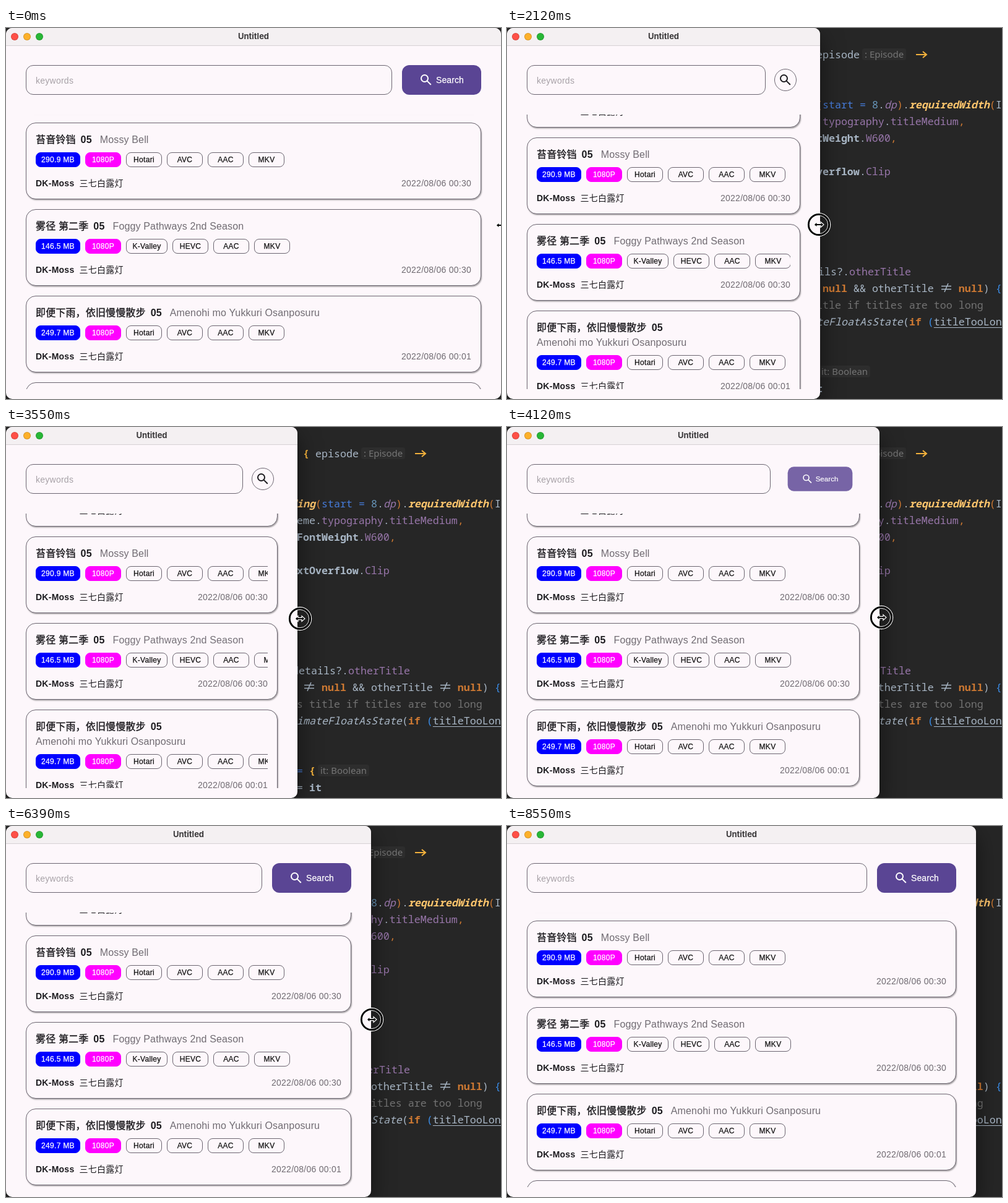
An HTML page that plays this animation: 800 by 600 pixels, repeating every 8610 ms.

```html
<!DOCTYPE html>
<html lang="en">
<head>
<meta charset="utf-8">
<title>Resizable window</title>
<style>
html, body { margin: 0; width: 100%; height: 100%; overflow: hidden; background: #262626; }
#stage { position: relative; width: 800px; height: 600px; overflow: hidden; background: #262626;
  font-family: "Liberation Sans", Arial, "Noto Sans CJK SC", "Noto Sans CJK", sans-serif; }
#stage div, #stage svg { position: absolute; box-sizing: border-box; white-space: pre; }

/* editor */
.line { height: 27px; line-height: 27px; color: #a9b7c6;
  font-family: "Noto Sans Mono", "DejaVu Sans Mono", monospace; font-size: 16.667px; }
.y { color: #ffc66d; font-style: italic; font-weight: 600; }
.g { color: #f2b13c; font-weight: 700; }
.k { color: #cc7832; font-weight: 700; }
.o { color: #cc7832; }
.p { color: #9876aa; }
.pi { color: #9876aa; font-style: italic; }
.b { color: #467cda; }
.br { color: #3b8eea; }
.n { color: #6897bb; }
.c { color: #727272; }
.i { font-style: italic; }
.w { font-weight: 700; }
.u { text-decoration: underline; text-underline-offset: 3px; text-decoration-thickness: 1px; }
.hl { background: #24472f; }
.hint { height: 19px; padding: 0 4px; border-radius: 4px; background: #2d2d2d;
  color: #757575; font: 15px/18px "Noto Sans", sans-serif; }

/* window */
#win { left: 0; top: 0; height: 600px; border-radius: 10px; overflow: hidden; background: #fdf7fb; }
#shade { left: 0; top: 0; height: 600px; border-radius: 10px;
  box-shadow: 0 0 1px rgba(0,0,0,.7), 0 14px 36px rgba(0,0,0,.5); }
#bar { left: 0; top: 0; width: 100%; height: 29px; background: #f4f0f2; border-bottom: 1px solid #d6d1d4;
  text-align: center; color: #3b393b; font: 700 13px/27px Inter, sans-serif; }
.dot { top: 8px; width: 12px; height: 12px; border-radius: 50%; border: .5px solid rgba(0,0,0,.15); }
#field { left: 32px; top: 60px; height: 48px; border: 1px solid #6c6671; border-radius: 12px;
  padding-left: 15px; line-height: 49px; font-size: 14px; letter-spacing: .25px; color: #a7a1a7; }
#wide { top: 60px; width: 128px; height: 48px; border-radius: 12px; background: #5a4594; color: #fff;
  font-size: 14px; letter-spacing: .1px; line-height: 48px; padding-left: 55px; -webkit-text-stroke: .25px; }
#wide svg { left: 27px; top: 12px; }
#round { top: 66px; width: 36px; height: 36px; border-radius: 50%; border: 1px solid #6c6671; color: #1c1b1f; }
#round svg { left: 5px; top: 5px; }
#list { left: 0; top: 140px; width: 100%; height: 444px; overflow: hidden; }
.card { left: 32px; border: 1px solid #6c6671; border-radius: 16px; background: #fdf7fb;
  box-shadow: 1px 1.5px 2px rgba(0,0,0,.36); }
.row { left: 15px; right: 15px; height: 24px; line-height: 24px; overflow: hidden; }
.title { top: 15px; font-size: 16px; letter-spacing: .15px; color: #1c1b1f; font-weight: 500; -webkit-text-stroke: .35px; }
.title b { margin-left: 8px; font-weight: 700; -webkit-text-stroke: 0; }
.sub { color: #706b72; font-weight: 400; -webkit-text-stroke: 0; }
.title .sub { margin-left: 13px; }
.second { top: 39px; font-size: 16px; letter-spacing: .15px; }
.second div { left: 0; bottom: 0; height: 24px; }
.chip { top: 0; height: 24px; line-height: 22px; border: 1px solid #6c6671; border-radius: 8px; text-align: center;
  font-size: 12px; letter-spacing: .3px; color: #111; -webkit-text-stroke: .25px; }
.foot { font-size: 14px; letter-spacing: .25px; color: #1c1b1f; }
.foot b { margin-right: 8px; }
.foot div { right: 0; top: 0; color: #706b72; }
</style>
</head>
<body>
<div id="stage"></div>
<script>
const LOOP = 8610;
const stage = document.getElementById('stage');

function add(parent, cls, html = '', css = {}) {
  const e = document.createElement('div');
  if (cls[0] === '#') e.id = cls.slice(1); else e.className = cls;
  e.innerHTML = html;
  Object.assign(e.style, css);
  parent.appendChild(e);
  return e;
}
const px = v => v + 'px';
const clamp = v => Math.max(0, Math.min(1, v));

// ---- editor: each part is "class|text"; y is the middle of the line
function code(y, x, ...parts) {
  const html = parts.map(s => {
    const [cls, text] = s.split('|');
    return `<span class="${cls}">${text}</span>`;
  }).join('');
  add(stage, 'line', html, { left: px(x), top: px(y - 13.5) });
}
function hint(y, x, text) {
  add(stage, 'hint', text, { left: px(x), top: px(y - 9) });
}
function glyph(x, y, path, color, width) {
  stage.insertAdjacentHTML('beforeend',
    `<svg width="20" height="16" style="left:${x}px;top:${y - 8}px"><path d="${path}" fill="none" stroke="${color}" stroke-width="${width}"/></svg>`);
}
const notEqual = (x, y) => glyph(x, y, 'M2 5.5H18M2 10.5H18M13 1L7 15', '#a9b7c6', 1.5);

code(42, 350, '|episode?.', 'y|let ', 'g|{ ', '|episode');
hint(42, 574, ': Episode');
glyph(660, 43, 'M1 8H18M12 3L18 8L12 13', '#f2b13c', 2);
code(96, 340, '|episode.', 'p|raw', 'o|,');
code(123, 340, '|Modifier.', 'y|padding', 'o|(', 'b|start = ', 'n|8', '|.', 'pi|dp', 'o|)', '|.', 'y|requiredWidth', 'o|(', '|I');
code(150, 340, 'b|style = ', '|AppTheme.', 'p|typography', '|.', 'p|titleMedium', 'o|,');
code(177, 340, 'b|fontWeight = ', 'w|FontWeight', '|.', 'p|W600', 'o|,');
code(204, 340, 'b|maxLines = ', 'n|1', 'o|,');
code(231, 340, 'b|overflow = ', 'w|TextOverflow', '|.', 'p|Clip');
code(366, 310, 'c|// other title');
hint(393, 364, ': String?');
code(393, 443, '|= details?.', 'p|otherTitle');
code(420, 350, 'p|chineseTitle', '|    ', 'k|null', '| &amp;&amp; otherTitle    ', 'k|null', '|) ', 'br|{');
notEqual(480, 420);
notEqual(700, 420);
code(447, 360, 'c|// hide this title if titles are too long');
hint(474, 364, ': Float');
code(474, 420, 'k|by ', 'i|animateFloatAsState', '|(', 'k|if ', 'br|(', 'u|titleTooLong');
code(528, 350, 'hl|title', 'o|,');
code(555, 340, 'b|onFlowChange = ', 'g|{');
hint(555, 504, 'it: Boolean');
code(582, 340, 'u|titleTooLong', '| = ', 'w|it');

// ---- window
const lens = `<svg width="24" height="24" viewBox="0 0 24 24"><g fill="none" stroke="currentColor" stroke-width="2">
<circle cx="9.5" cy="9.5" r="5.5"/><path d="M13.6 13.6L19.8 19.8"/></g></svg>`;
const shade = add(stage, '#shade');
const win = add(stage, '#win');
add(win, '#bar', 'Untitled');
['#ff5047', '#fdb02a', '#28b737'].forEach((c, i) => add(win, 'dot', '', { left: px(8 + 20 * i), background: c }));
const field = add(win, '#field', 'keywords');
const wide = add(win, '#wide', lens + 'Search');
const round = add(win, '#round', lens);
const list = add(win, '#list');

function makeCard({ name, sub, size, tags, date, limit }) {
  const box = add(list, 'card');
  const title = add(box, 'row title', `${name}<b>05</b><span class="sub">${sub}</span>`);
  const second = add(box, 'row second', `<div class="sub">${sub}</div>`);
  const chips = add(box, 'row');
  let x = 0;
  [[size, 72, '#0000ff'], ['1080P', 58, '#ff00ff'], ...tags.map(s => [s, s.length > 7 ? 67 : 58])].forEach(([text, w, fill]) => {
    const css = { left: px(x), width: px(w) };
    if (fill) Object.assign(css, { background: fill, borderColor: fill, color: '#fff' });
    add(chips, 'chip', text, css);
    x += w + 8;
  });
  const foot = add(box, 'row foot', `<b>DK-Moss</b>三七白露灯<div>${date}</div>`);
  return { box, second, chips, foot, sub, inline: title.querySelector('.sub'),
    short: sub.replace(/ \S+$/, ' …'), fit: track(limit) };
}

// ---- motion: [time, window width]
const widths = [
  [0, 800], [250, 800], [500, 766], [1441, 616.2], [1450, 614], [2800, 397], [2880, 390], [3000, 384], [3160, 384],
  [3300, 412], [3990, 575], [4120, 602], [4300, 630], [4450, 638], [4580, 628], [4910, 575], [5078, 556.2],
  [5120, 549], [5300, 534], [5450, 530], [5600, 536], [5850, 572], [6050, 585], [6390, 590], [6700, 594],
  [7000, 612], [7300, 645], [7900, 745], [8060, 758], [LOOP, 758]
];
const heights = [[0, 319], [250, 319], [1450, 323], [2880, 313], [4120, 308], [5120, 306], [6390, 313], [LOOP, 316]];

function at(keys, t) {
  const i = keys.findIndex(k => k[0] > t);
  if (i < 0) return keys[keys.length - 1][1];
  if (i === 0) return keys[0][1];
  const [t0, a] = keys[i - 1], [t1, b] = keys[i];
  return a + (b - a) * (t - t0) / (t1 - t0);
}

// Moments when the width passes a limit; gives state and age of that state.
function track(limit) {
  const marks = [[-9999, false]];
  for (let t = 0; t < LOOP; t += 2) {
    const narrow = at(widths, t) < limit;
    if (narrow !== marks[marks.length - 1][1]) marks.push([t, narrow]);
  }
  return t => {
    const [since, narrow] = marks.filter(m => m[0] <= t).pop();
    return { narrow, age: t - since };
  };
}
function spring(ms) {
  const s = ms / 28;
  return 1 - (1 + s) * Math.exp(-s);
}

const mossy = { name: '苔音铃铛', sub: 'Mossy Bell', size: '290.9 MB', tags: ['Hotari', 'AVC', 'AAC', 'MKV'], date: '2022/08/06 00:30', limit: 275 };
const foggy = { name: '雾径 第二季', sub: 'Foggy Pathways 2nd Season', size: '146.5 MB', tags: ['K-Valley', 'HEVC', 'AAC', 'MKV'], date: '2022/08/06 00:30', limit: 432 };
const rainy = { name: '即便下雨，依旧慢慢散步', sub: 'Amenohi mo Yukkuri Osanposuru', size: '249.7 MB', tags: ['Hotari', 'AVC', 'AAC', 'MKV'], date: '2022/08/06 00:01', limit: 556.2 };
const cards = [{ ...rainy, limit: 616.2 }, mossy, foggy, rainy, mossy].map(makeCard);
const compact = track(575);

// ---- pointer
stage.insertAdjacentHTML('beforeend', `<svg id="pointer" width="44" height="44" viewBox="-22 -22 44 44">
<g id="ring" fill="none"><circle r="18.6" stroke="#fff" stroke-width="1.2"/><circle r="16.6" stroke="#000" stroke-width="3"/>
<circle r="14.7" stroke="#fff" stroke-width=".9"/></g>
<path d="M-8 0L-3 -4.5V-1.7H3V-4.5L8 0L3 4.5V1.7H-3V4.5Z" fill="#000" stroke="#fff" stroke-width="1.2"/></svg>`);
const pointer = document.getElementById('pointer');
const ring = document.getElementById('ring');

function drawSearch(t, w) {
  const { narrow, age } = compact(t);
  const grow = 1 - (1 - clamp(age / 135)) ** 3;
  const slot = narrow ? 128 - 88 * grow : 40 + 88 * grow;
  const left = w - 32 - slot;
  const scale = Math.min(1, .7 + age * .0009);
  const enter = clamp(age / 160), leave = clamp(1 - age / 90);
  field.style.width = px(left - 16 - 32);
  const place = (e, x, on) => {
    e.style.left = px(x);
    e.style.opacity = on ? enter : leave;
    e.style.transform = `scale(${on ? scale : 1})`;
  };
  place(wide, left + slot / 2 - 64, !narrow);
  place(round, left - 2, narrow);
}

function drawCards(t, w) {
  let y = 13 - 140;
  for (const c of cards) {
    const { narrow, age } = c.fit(t);
    const p = narrow ? spring(age) : 1 - spring(age);
    const extra = 24 * p;
    Object.assign(c.box.style, { top: px(y), width: px(w - 64), height: px(124 + extra) });
    const text = narrow ? c.short : c.sub;
    if (c.inline.textContent !== text) c.inline.textContent = text;
    c.inline.style.opacity = (1 - p) ** 2;
    c.second.style.height = px(extra);
    c.second.style.opacity = p;
    c.chips.style.top = px(47 + extra);
    c.foot.style.top = px(85 + extra);
    y += 140 + extra;
  }
}

function drawPointer(t) {
  const x = t < 250 ? 800 : at(widths, t + 15) + .5 + Math.max(0, t - 8060) * .4;
  pointer.style.left = px(x - 22);
  pointer.style.top = px(at(heights, t) - 22);
  pointer.style.display = t > 8300 ? 'none' : '';
  ring.style.display = t >= 250 && t < 8060 ? '' : 'none';
}

function draw(t) {
  const w = Math.round(at(widths, t));
  win.style.width = shade.style.width = px(w);
  drawSearch(t, w);
  drawCards(t, w);
  drawPointer(t);
}

const start = performance.now();
function tick() {
  draw((performance.now() - start) % LOOP);
  requestAnimationFrame(tick);
}
draw(0);
requestAnimationFrame(tick);
</script>
</body>
</html>
```
